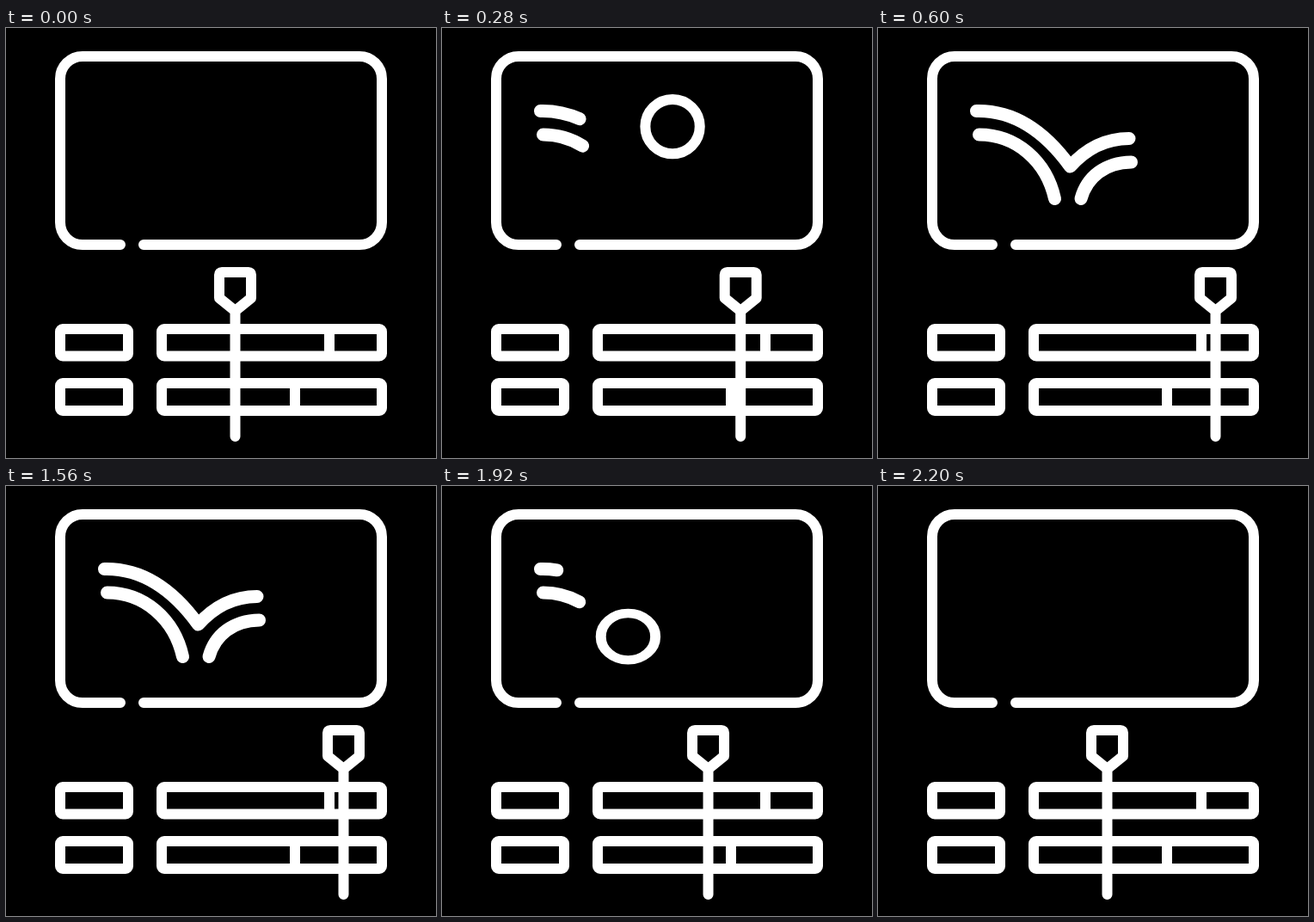
Recreate the animation shown at these times as an HTML page. Size 500 px wide and 500 px high, loop 3000 ms.

```html
<!DOCTYPE html>
<html lang="en">
<head>
<meta charset="utf-8">
<title>Timeline bounce</title>
<style>
  html, body { margin: 0; height: 100%; overflow: hidden; background: #000; }
  svg { display: block; width: 100vw; height: 100vh; }
  svg * { fill: none; stroke: #fff; stroke-width: 12; stroke-linecap: round; stroke-linejoin: round; }
  #trails path { stroke-width: 15; }
</style>
</head>
<body>
<svg viewBox="0 0 500 500">
  <path d="M160 252H411A26 26 0 0 0 437 226V59A26 26 0 0 0 411 33H89A26 26 0 0 0 63 59V226A26 26 0 0 0 89 252H133"/>
  <rect x="63" y="350" width="79" height="31.5" rx="3"/>
  <rect x="63" y="413" width="79" height="32" rx="3"/>
  <rect x="181" y="350" width="256" height="31.5" rx="3"/>
  <rect x="181" y="413" width="256" height="32" rx="3"/>
  <path d="M376 350V381M336 413V445"/>
  <g id="trails">
    <path id="upper" pathLength="1" d="M114.5 96.5C160 95.5 196 123 223.5 161C241 141.5 263 128.5 292 128.5"/>
    <path id="lowerLeft" pathLength="1" d="M117.5 124C161 124 196 155 205.5 198.5"/>
    <path id="lowerRight" pathLength="1" d="M236 198.5C243 173 264 156.5 294.5 156"/>
  </g>
  <circle id="ball" r="31.7"/>
  <path id="playhead" d="M-18.5 287q0-3 3-3h31q3 0 3 3v27L0 329L-18.5 314ZM0 329V475"/>
</svg>
<script>
const LOOP = 3000, STEP = 40, TURN = 1560;
const get = id => document.getElementById(id);
const clamp = v => Math.min(1, Math.max(0, v));

// Cubic timing curve with handles (a, 0) and (b, 1).
function ease(t, start, end, a = 1 / 3, b = 2 / 3) {
  const x = clamp((t - start) / (end - start));
  let lo = 0, hi = 1;
  if (x === 0 || x === 1) return x;
  for (let i = 0; i < 24; i++) {
    const s = (lo + hi) / 2, r = 1 - s;
    if (3 * s * r * r * a + 3 * s * s * r * b + s * s * s < x) lo = s;
    else hi = s;
  }
  return lo * lo * (3 - 2 * lo);
}

function drawTrail(id, amount) {
  const trail = get(id);
  trail.style.display = amount > 0 ? "" : "none";
  trail.style.strokeDasharray = amount < 1 ? `${amount} 2` : "none";
}

function drawBall(p) {
  const impact = 0.36;
  const x = p < impact ? 123.5 + 272 * p : 221.5 + 166 * (p - impact);
  const y = p < impact
    ? 106 + 81 * (p / impact) ** 3
    : 99 + 88 * ((1 - p) / (1 - impact)) ** 3;
  const size = clamp(Math.min(p / 0.12, (1 - p) / 0.1));
  const squash = 1 - 0.18 * clamp(1 - Math.abs(x - 221.5) / 24);
  get("ball").setAttribute("transform", `translate(${x} ${y}) scale(${size} ${size * squash})`);
  get("ball").style.display = size > 0 ? "" : "none";
}

function render(t) {
  const back = t >= TURN;
  const p = back ? 1 - ease(t, TURN, 2080, 0.6, 0.69) : ease(t, 0, 560, 0.592, 0.27);
  get("playhead").setAttribute("transform", `translate(${266.5 + 126 * p} 0)`);
  drawBall(p);
  drawTrail("upper", back ? 1 - ease(t, TURN, 2200, 0.3, 0) : ease(t, 200, 600, 0.3, 0.2));
  drawTrail("lowerLeft", back ? 1 - ease(t, 1680, 2080) : ease(t, 200, 388));
  drawTrail("lowerRight", back ? 1 - ease(t, TURN, 1760) : ease(t, 360, 600, 0.2, 0.4));
}

const begin = performance.now();
function tick() {
  const t = (performance.now() - begin) % LOOP;
  render(Math.floor(t / STEP) * STEP);
  requestAnimationFrame(tick);
}
tick();
</script>
</body>
</html>
```
